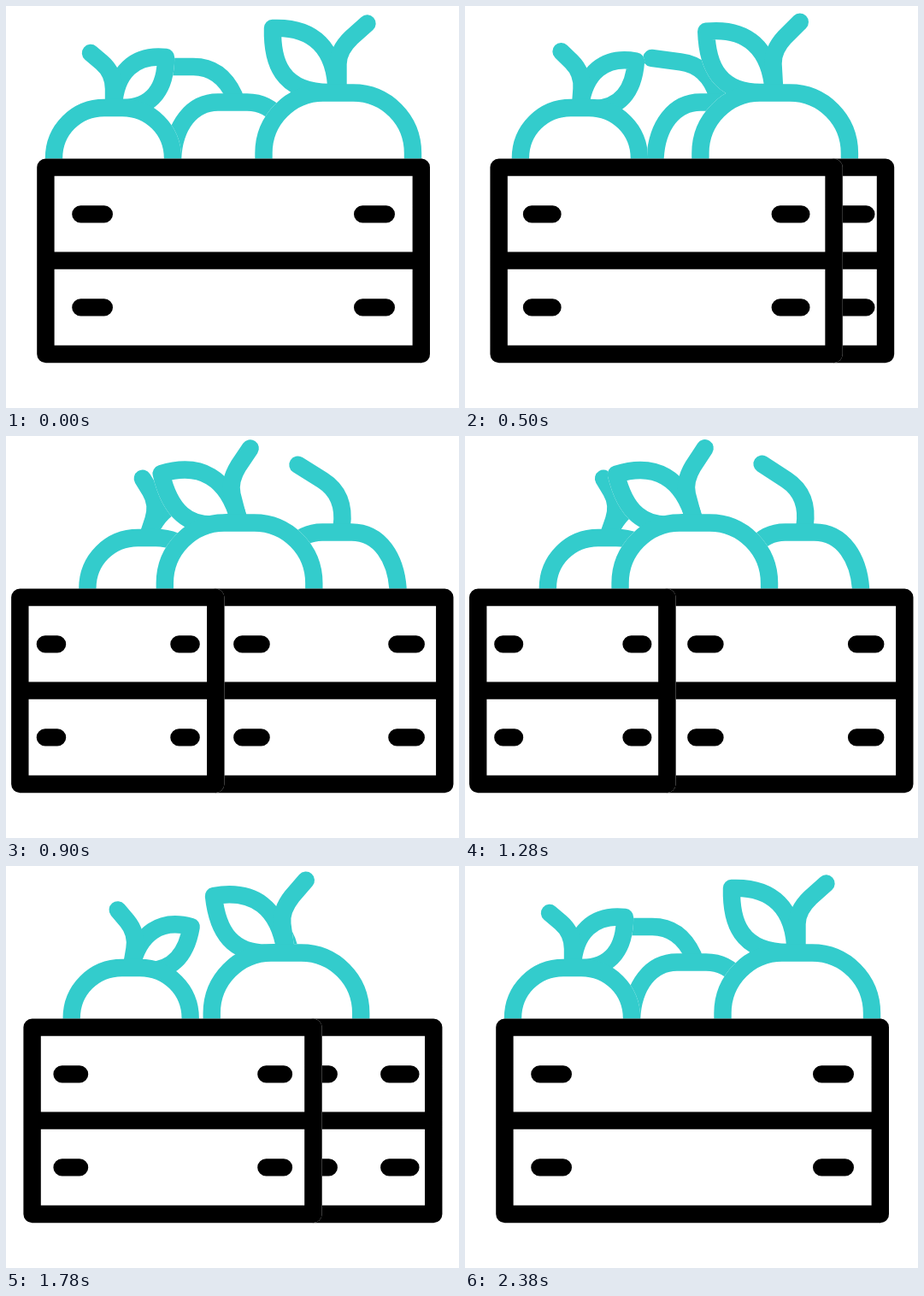
An HTML page with a canvas that plays this animation: 530x470 px, repeating every 2400 ms.

```html
<!DOCTYPE html>
<html lang="en">
<head>
<meta charset="utf-8">
<title>Fruit crates</title>
<style>
  html, body { margin: 0; width: 100%; height: 100%; overflow: hidden; background: #fff; }
  canvas { display: block; }
</style>
</head>
<body>
<canvas width="530" height="470"></canvas>
<script>
const ctx = document.querySelector('canvas').getContext('2d');
const LOOP = 2400, OPEN_END = 1181, CLOSE_END = 2383;
const TEAL = '#33cccc', STROKE = 20.4;

const part = (path, x, y) => ({ path: new Path2D(path), x, y });

// each fruit slides by `shift`; its leaf and stem also turn by `turn` degrees around their pivots
const fruits = [
  {
    body: new Path2D('M195 188V178C197 140 217 112.5 248 112.5H282C317 112.5 334 145 336.5 178V188'),
    parts: [part('M185 71H219C241 71 257 83 267 105', 267, 112)],
    shift: 127, turn: 33.5
  },
  {
    body: new Path2D('M56 188V178C56 145 82 119 115 119H136C169 119 195 145 195 178V188'),
    parts: [
      part('M187 60C150 56 128 78 126 117L137 119C172 119 187 95 187 60Z', 126, 119),
      part('M99 55L112 66Q126 78 126 97V117', 126, 119)
    ],
    shift: 41, turn: 19
  },
  {
    body: new Path2D('M301.5 188V172C301.5 133 333 101.5 371 101.5H406C445 101.5 476 133 476 172V188'),
    parts: [
      part('M312 26C360 24 386 50 386.5 101H378C322 101 311 65 312 26Z', 376, 93),
      part('M422.5 20.5L404 37Q388.5 52 388.5 68V100', 388, 101)
    ],
    shift: -120.4, turn: -15
  }
];

const mix = (a, b, p) => a + (b - a) * p;

// symmetric cubic-bezier(.825, 0, .175, 1)
function ease(x) {
  let lo = 0, hi = 1;
  for (let i = 0; i < 24; i++) {
    const s = (lo + hi) / 2, r = 1 - s;
    if (3 * .825 * s * r * r + 3 * .175 * s * s * r + s * s * s < x) lo = s; else hi = s;
  }
  return lo * lo * (3 - 2 * lo);
}

function progress(t) {
  if (t < OPEN_END) return ease(t / OPEN_END);
  return 1 - ease(Math.min(1, (t - OPEN_END) / (CLOSE_END - OPEN_END)));
}

function fill(path) {
  ctx.fillStyle = '#fff';
  ctx.fill(path);
}

function stroke(path, color) {
  ctx.strokeStyle = color;
  ctx.stroke(path);
}

function drawFruit({ body, parts, shift, turn }, p) {
  const eachPart = paint => {
    for (const { path, x, y } of parts) {
      ctx.save();
      ctx.translate(x, y);
      ctx.rotate(turn * p * Math.PI / 180);
      ctx.translate(-x, -y);
      paint(path);
      ctx.restore();
    }
  };
  ctx.save();
  ctx.translate(shift * p, 0);
  stroke(body, '#fff');
  eachPart(path => { fill(path); stroke(path, '#fff'); });
  eachPart(path => stroke(path, TEAL));
  fill(body);
  stroke(body, TEAL);
  ctx.restore();
}

// left and right are outer edges, slots are pairs of outer ends
function drawCrate(left, right, slots) {
  const h = STROKE / 2, l = left + h, r = right - h;
  const frame = new Path2D();
  frame.rect(l, 188.6, r - l, 218.4);
  fill(frame);
  stroke(frame, '#fff');
  const line = (a, b, y) => { frame.moveTo(a, y); frame.lineTo(b, y); };
  line(l, r, 297.6);
  for (const [a, b] of slots) for (const y of [243.4, 352.4]) line(a + h, b - h, y);
  stroke(frame, '#000');
}

function draw(now) {
  const p = progress(now % LOOP);
  ctx.fillStyle = '#fff';
  ctx.fillRect(0, 0, 530, 470);
  ctx.lineWidth = STROKE;
  ctx.lineCap = ctx.lineJoin = 'round';

  for (const fruit of fruits) drawFruit(fruit, p);

  const edge = mix(496, 245.6, p);
  drawCrate(edge - STROKE, mix(496, 524.6, p), [
    [mix(428, 259.5, p), mix(475.5, 302, p)],
    [mix(428, 448, p), mix(476.5, 490.5, p)]
  ]);
  drawCrate(mix(36.2, 4.9, p), edge, [
    [mix(77.2, 34, p), mix(125, 68, p)],
    [mix(407, 183.5, p), mix(455, 217.5, p)]
  ]);
  requestAnimationFrame(() => draw(performance.now()));
}
draw(0);
</script>
</body>
</html>
```
